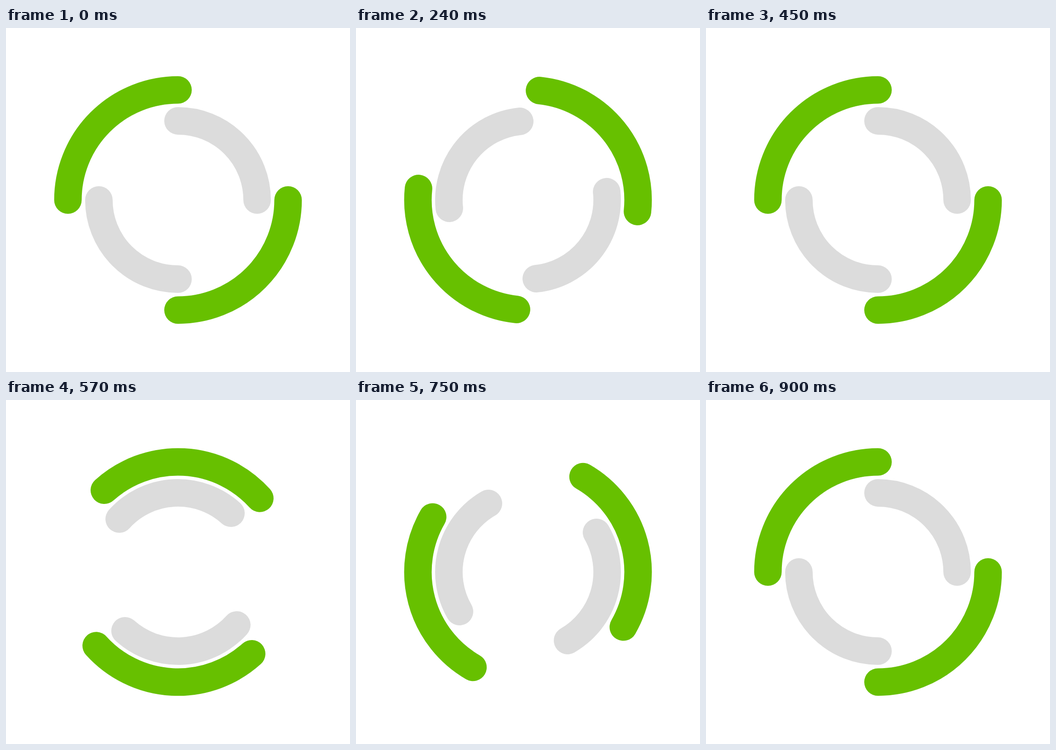
Recreate the animation shown at these times as an HTML page. Size 748x748 px, loop 0.93 s.

```html
<!DOCTYPE html>
<html lang="en">
<head>
<meta charset="utf-8">
<title>Spinner</title>
<style>
  html, body { margin: 0; height: 100%; overflow: hidden; background: #fff; }
  svg { display: block; width: 100vw; height: 100vh; }
  path { fill: none; stroke-width: 8; stroke-linecap: round; }
</style>
</head>
<body>
<svg viewBox="-50 -50 100 100">
  <path id="outer" stroke="#67c000" d="M-32 0A32 32 0 0 1 0-32M32 0A32 32 0 0 1 0 32"/>
  <path id="inner" stroke="#dcdcdc" d="M0-23A23 23 0 0 1 23 0M0 23A23 23 0 0 1-23 0"/>
</svg>
<script>
  const LOOP = 930, STEP = 30, DEGREES = 12;
  const outer = document.getElementById('outer');
  const inner = document.getElementById('inner');

  // Stepped rotation: one full turn in 30 steps, then a one-step rest.
  function draw(now) {
    const angle = Math.floor((now % LOOP) / STEP + 1e-3) * DEGREES;
    outer.setAttribute('transform', `rotate(${angle})`);
    inner.setAttribute('transform', `rotate(${-angle})`);
    requestAnimationFrame(draw);
  }
  draw(0);
</script>
</body>
</html>
```
